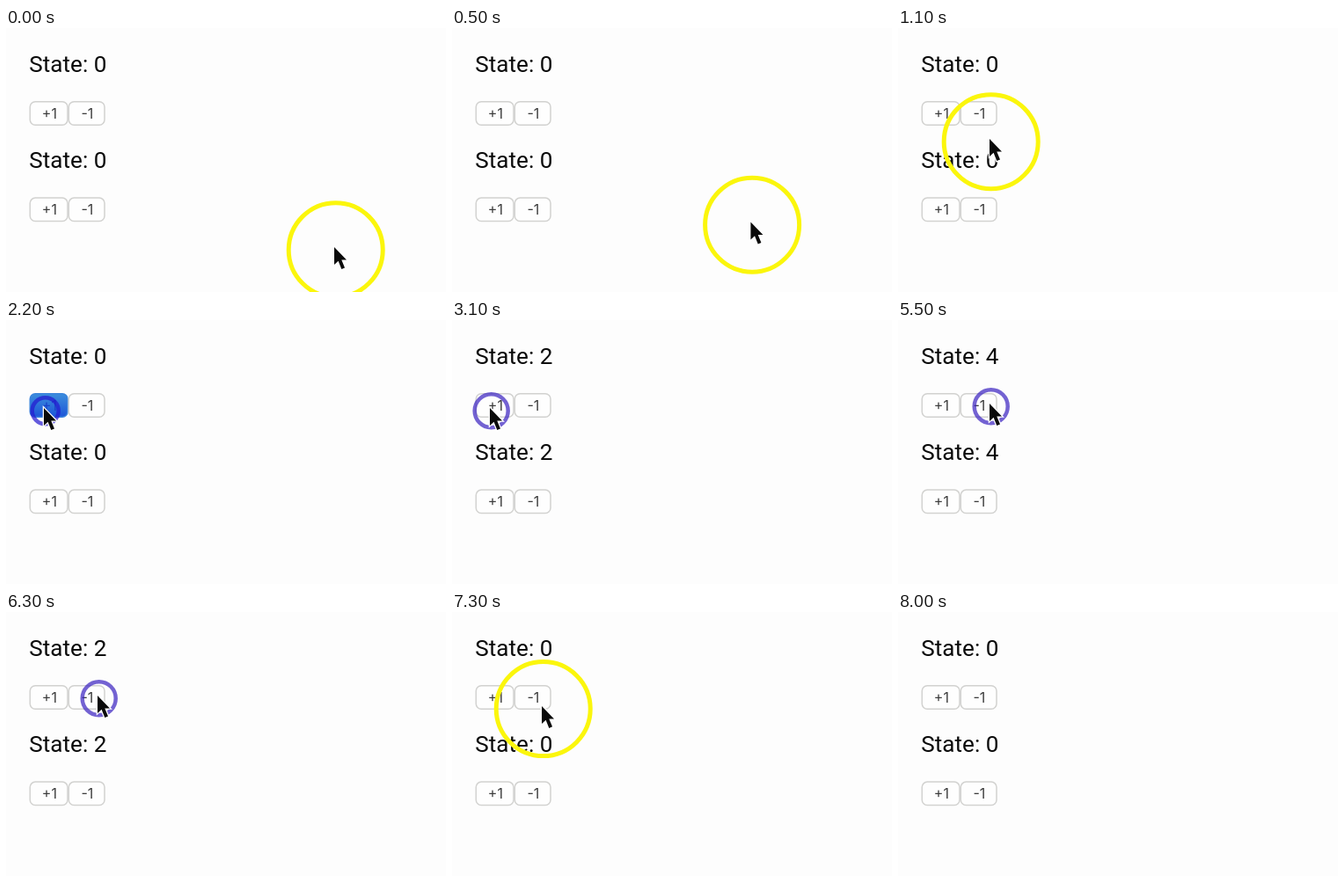
An HTML page that plays this animation: 500 px wide and 300 px high, repeating every 10 s.

```html
<!DOCTYPE html>
<html lang="en">
<head>
<meta charset="utf-8">
<style>
  html, body { margin: 0; width: 100%; height: 100%; overflow: hidden; background: #fdfdfd; }
  svg { display: block; width: 500px; height: 300px; }
  text { font-family: Roboto, Inter, sans-serif; fill: #0a0a0a; }
  .state { font-size: 26.1px; }
  .label { font: 16px Inter, Roboto, sans-serif; text-anchor: middle; fill: #3c3c3c; }
  .button { fill: #fefefe; stroke: #d2d2d0; stroke-width: 1.5; }
  .pressed .button { fill: url(#blue); stroke: #3a84dc; }
  .pressed .label { fill: #1c44c8; }
</style>
</head>
<body>
<svg viewBox="0 0 500 300">
  <defs>
    <linearGradient id="blue" x2="0" y2="1">
      <stop offset="0" stop-color="#3c8edc"/>
      <stop offset="1" stop-color="#1c54d8"/>
    </linearGradient>
  </defs>
  <g id="counters"></g>
  <g id="pointer">
    <circle id="ring" cx="1.7" cy="3.2" fill="none"/>
    <path d="M0 0V20L4.6 15.8L8.3 25L12 23.4L8.3 14.5H14Z" fill="#0a0a0a" stroke="#fff" stroke-width="2.5" paint-order="stroke"/>
  </g>
</svg>
<script>
const LOOP = 10000, STEP = 100;
const PRESSED = 15, RELEASED = 19, GROWING = 30, HOVER = 53.5;

// time, ring radius, counter value
const events = [
  [0, HOVER, 0],
  [2200, PRESSED, 0], [2400, RELEASED, 1], [2600, GROWING, 1], [2800, HOVER, 1],
  [2900, PRESSED, 1], [3100, RELEASED, 2], [3300, GROWING, 2],
  [3400, PRESSED, 2], [3600, RELEASED, 3], [3700, GROWING, 3],
  [3800, PRESSED, 3], [3900, RELEASED, 4], [4000, GROWING, 4],
  [4100, PRESSED, 4], [4300, RELEASED, 5], [5300, HOVER, 5],
  [5400, PRESSED, 5], [5500, RELEASED, 4], [5600, GROWING, 4],
  [5800, PRESSED, 4], [6000, RELEASED, 3], [6100, GROWING, 3],
  [6200, PRESSED, 3], [6300, RELEASED, 2], [6400, GROWING, 2],
  [6500, PRESSED, 2], [6600, RELEASED, 1], [6800, HOVER, 1],
  [6900, PRESSED, 1], [7000, RELEASED, 0], [7100, HOVER, 0]
];

// time, pointer tip x and y
const path = [
  [0, 373, 249], [300, 383, 238], [1100, 104, 126], [1500, 43, 100],
  [4300, 43, 100], [4700, 104, 95], [7200, 104, 95], [8000, 58, 372], [LOOP, 58, 372]
];

const byId = id => document.getElementById(id);
const button = (x, y, width, label) => `<g>
  <rect class="button" x="${x}" y="${y}" width="${width}" height="26.5" rx="6"/>
  <text class="label" x="${x + width / 2 + 0.7}" y="${y + 18.7}">${label}</text></g>`;

byId('counters').innerHTML = [0, 109.3].map(y => `<g transform="translate(0 ${y})">
  <text class="state" x="26.3" y="49.7"></text>
  ${button(27.3, 83.8, 42.7, '+1')}${button(71.3, 83.8, 40.7, '-1')}</g>`).join('');

const states = document.querySelectorAll('.state');
const [plus, minus] = document.querySelectorAll('#counters g g');
const ring = byId('ring'), pointer = byId('pointer');

function pointerAt(time) {
  const next = path.findIndex(point => point[0] > time);
  const [t0, x0, y0] = path[next - 1], [t1, x1, y1] = path[next];
  const p = (time - t0) / (t1 - t0), eased = p * p * (3 - 2 * p);
  return [x0 + (x1 - x0) * eased, y0 + (y1 - y0) * eased];
}

function draw(time) {
  const [, radius, count] = events.filter(event => event[0] <= time).pop();
  const [x, y] = pointerAt(time);
  const down = radius === PRESSED, hover = radius === HOVER;

  states.forEach(text => text.textContent = `State: ${count}`);
  plus.classList.toggle('pressed', down && x < 70);
  minus.classList.toggle('pressed', down && x > 70);
  ring.setAttribute('r', radius);
  ring.setAttribute('stroke', hover ? '#fbf60c' : down ? '#2418d0' : '#3a22c0');
  ring.setAttribute('stroke-width', hover ? 5 : 4.5);
  ring.setAttribute('opacity', hover ? 1 : radius === GROWING ? 0.4 : 0.7);
  pointer.setAttribute('transform', `translate(${x} ${y})`);
}

const start = performance.now();
function tick() {
  const time = (performance.now() - start) % LOOP;
  draw(Math.floor(time / STEP) * STEP);
  requestAnimationFrame(tick);
}
tick();
</script>
</body>
</html>
```
